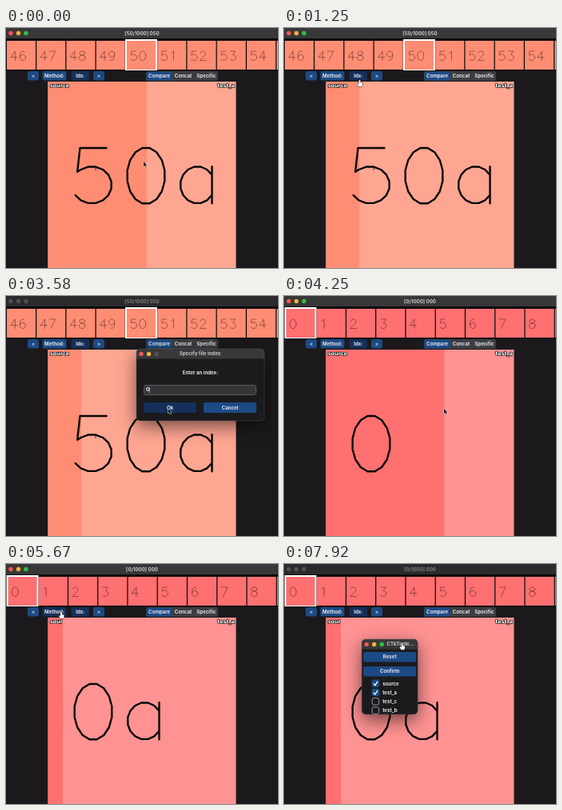
These frames come from a looping animation (340 by 300 pixels, 8000 ms). An HTML page with a canvas:

```html
<!DOCTYPE html>
<html lang="en">
<head>
<meta charset="utf-8">
<title>Image compare viewer</title>
<style>
html, body { margin: 0; width: 100%; height: 100%; overflow: hidden; background: #1b191c; }
canvas { display: block; width: 340px; height: 300px; }
</style>
</head>
<body>
<canvas id="stage" width="340" height="300"></canvas>
<script>
const ctx = document.getElementById('stage').getContext('2d');
const FPS = 12, FRAMES = 96;
const BLUE = '#1c4a85', HOVER = '#14305a', DARK = '#1b191c', BAR = '#38383a';
const LIGHTS = ['#f5564f', '#f5b52e', '#2fc23f'], GREY = '#515153';
const ASK = 18, LOAD = 46, PICK = 75, DRAG = 85;

// Stroke glyphs on a 21-unit-high grid; round parts are runs of a 16-sided ring.
function ring(cx, cy, rx, ry, first, last) {
  const pts = [], step = Math.sign(last - first);
  for (let i = first; i !== last + step; i += step) {
    const a = (i + .5) * Math.PI / 8;
    pts.push(`${(cx + rx * Math.cos(a)).toFixed(2)} ${(cy - ry * Math.sin(a)).toFixed(2)}`);
  }
  return pts.join(' ');
}
const GLYPHS = {
  0: `M${ring(10, 10.5, 7.2, 10.7, 0, 16)}`,
  1: 'M6 4L8 3 11 0V21',
  2: `M${ring(10, 5.5, 6, 5.5, 7, -2)} 3 21H17`,
  3: `M5 0H16L10 8 ${ring(10, 14.5, 7, 6.5, 3, -7)}`,
  4: 'M13 21V0L3 14H18',
  5: `M15 0L5 0 4 9 ${ring(9.5, 14, 7.5, 7, 5, -7)}`,
  6: `M${ring(10.5, 10.5, 6.5, 10.5, 2, 8)}M${ring(10.5, 14.5, 6.5, 6.5, 0, 16)}`,
  7: 'M3 0H17L7 21',
  8: `M${ring(10, 4.5, 6, 4.5, 0, 16)}M${ring(10, 15, 7, 6, 0, 16)}`,
  9: `M${ring(9.5, 10.5, 6.5, 10.5, 10, 16)}M${ring(9.5, 6.5, 6.5, 6.5, 0, 16)}`,
  a: `M15 7V21M${ring(9.5, 14, 6.5, 7, 1, 14)}`
};
for (const g in GLYPHS) GLYPHS[g] = new Path2D(GLYPHS[g]);

const ARROW = new Path2D('M0 0V6L1.3 4.8 2.2 6.8 3.2 6.4 2.4 4.4H4.2Z');
const HAND = new Path2D('M-.9.6Q0-.6.9.6V3L3.6 3.7V6L2.8 8.3H-1L-2.9 5.2-2.2 4.2-.9 5Z');

// Pointer moves: [leave, arrive, x, y]
const MOVES = [
  [0, 13, 94, 69], [13, 15, 94.5, 65],    // to the index button
  [20, 28, 230, 118], [35, 41, 203, 141], // to the entry, then Ok
  [47, 51, 200, 141], [51, 64, 71, 68],   // sweep over the picture
  [65, 68, 69, 60],                       // to the method button
  [76, 83, 65.5, 260.5], [DRAG, 93, 147.5, 99]
];

const asking = f => f >= ASK && f < LOAD;

function pointer(f) {
  let x = 172, y = 167;
  for (const [leave, arrive, toX, toY] of MOVES) {
    const u = Math.min(1, Math.max(0, (f - leave) / (arrive - leave)));
    const e = u * u * (3 - 2 * u);
    x += (toX - x) * e;
    y += (toY - y) * e;
  }
  return [x, y];
}

// The divider trails the pointer by one step while it is over the picture.
function divider(f) {
  for (let k = f - 1; k >= 0; k--) {
    const [x, y] = pointer(k);
    if (y > 67 && !asking(k) && k < PICK) return x;
  }
  return 176;
}

function rect(x, y, w, h, fill) {
  ctx.fillStyle = fill;
  ctx.fillRect(x, y, w, h);
}

function round(x, y, w, h, r, fill, stroke) {
  ctx.beginPath();
  ctx.roundRect(x, y, w, h, r);
  ctx.fillStyle = fill;
  ctx.fill();
  if (stroke) {
    ctx.strokeStyle = stroke;
    ctx.lineWidth = 1;
    ctx.stroke();
  }
}

function text(s, x, y, color = '#e4e6ea', align = 'center') {
  ctx.font = '700 6.1px Inter, sans-serif';
  ctx.textAlign = align;
  ctx.fillStyle = color;
  ctx.fillText(s, x, y);
}

function lights(x, y, colors) {
  colors.forEach((c, i) => {
    ctx.beginPath();
    ctx.arc(x + i * 9.5, y, 2.7, 0, 7);
    ctx.fillStyle = c;
    ctx.fill();
  });
}

function button(label, x, y, w, h, [px, py], pressed) {
  const over = px >= x && px <= x + w && py >= y && py <= y + h;
  round(x, y, w, h, 2.5, over || pressed ? HOVER : BLUE);
  text(label, x + w / 2, y + h / 2 + .3);
}

function glyphs(s, x, y, scale, width, color) {
  ctx.save();
  ctx.translate(x, y);
  ctx.scale(scale, scale);
  ctx.lineWidth = width / scale;
  ctx.lineJoin = ctx.lineCap = 'round';
  ctx.strokeStyle = color;
  for (const c of s) {
    ctx.stroke(GLYPHS[c]);
    ctx.translate(20, 0);
  }
  ctx.restore();
}

function tag(s, x, align) {
  ctx.font = '700 6.4px "DejaVu Sans", sans-serif';
  ctx.textAlign = align;
  ctx.lineJoin = 'round';
  ctx.lineWidth = 1.3;
  ctx.strokeStyle = '#111';
  ctx.strokeText(s, x, 72.8);
  ctx.fillStyle = '#fff';
  ctx.fillText(s, x, 72.8);
}

function layer(x, end, color, s, label, labelX, align) {
  ctx.save();
  ctx.beginPath();
  ctx.rect(x, 67, end - x, 233);
  ctx.clip();
  rect(52, 67, 236, 233, color);
  glyphs(s, 76, 150, 3.3, 2.4, '#080606');
  tag(label, labelX, align);
  ctx.restore();
}

function strip(first, selected, base, color) {
  rect(0, 13, 340, 41, '#0d0c0e');
  for (let i = 0; i < 10; i++) {
    const n = first + i;
    const x = base + 37.25 * i + (n === selected ? 1 : n > selected ? 2 : 0);
    if (n === selected) rect(x - 2, 14, 40, 39, '#fff');
    rect(x, 16, 36, 36, color);
    glyphs(String(n), x + 3.2, 29, .55, .6, 'rgba(25,5,5,.7)');
  }
}

function frameWindow(x, y, w, h, title, titleX, colors) {
  ctx.save();
  ctx.shadowColor = 'rgba(0,0,0,.55)';
  ctx.shadowBlur = 22;
  ctx.shadowOffsetY = 7;
  round(x, y, w, h, 5, '#1b1b1d');
  ctx.restore();
  round(x, y, w, 12.5, [5, 5, 0, 0], BAR);
  round(x, y, w, h, 5, 'transparent', 'rgba(90,90,92,.4)');
  lights(x + 6, y + 6.4, colors);
  text(title, titleX, y + 6.6, '#c9c9cb');
}

function indexDialog(f, p) {
  frameWindow(163, 66, 160, 90, 'Specify file index', 242.5, [LIGHTS[0], LIGHTS[1], GREY]);
  text('Enter an index:', 243, 96);
  round(172.5, 111.5, 140, 12, 2.5, '#343638', '#565b5e');
  const typed = f >= 33 ? '0' : '';
  text(typed, 175, 117.5, '#e4e6ea', 'left');
  if (f >= 31) rect(typed ? 179 : 175, 114, .7, 7, '#ddd');
  button('Ok', 172, 133, 66, 13, p);
  button('Cancel', 247, 133, 66, 13, p);
}

function picker(f, p) {
  const grip = pointer(Math.max(f, DRAG));
  const x = grip[0] - 50.3, y = grip[1] - 5;
  frameWindow(x, y, 70, 94, 'CTkTople...', x + 48.5, LIGHTS);
  button('Reset', x + 2, y + 16, 66, 12.5, p);
  button('Confirm', x + 2, y + 34, 66, 12.5, p);
  ['source', 'test_a', 'test_c', 'test_b'].forEach((name, i) => {
    const bx = x + 12.5, by = y + 50.5 + i * 11.3;
    if (i < 2) {
      round(bx, by, 9.5, 9.5, 2, BLUE);
      ctx.lineWidth = 1.3;
      ctx.strokeStyle = '#fff';
      ctx.stroke(new Path2D(`M${bx + 2.2} ${by + 5}l2 2.2 3.2-5`));
    } else {
      round(bx + .5, by + .5, 8.5, 8.5, 2, '#1b1b1d', '#949a9f');
    }
    text(name, x + 26, by + 5.2, '#e4e6ea', 'left');
  });
}

function toolbar(p) {
  rect(0, 53.5, 340, 13.5, DARK);
  button('<', 27, 54, 14, 11.5, p);
  button('Method:', 45.5, 54, 30, 11.5, p);
  button('Idx:', 81.5, 54, 22.5, 11.5, p, true);
  button('>', 109, 54, 14, 11.5, p);
  round(175, 54, 90, 12, 2.5, '#3d3d41');
  round(175.5, 54.5, 32, 11, 2.5, BLUE);
  text('Compare', 191.5, 60.3);
  text('Concat', 221.5, 60.3);
  text('Specific', 250.5, 60.3);
}

function cursor(f, p) {
  const hand = (p[1] < 67 && !asking(f)) || f >= PICK;
  ctx.save();
  ctx.translate(...p);
  ctx.lineWidth = .9;
  ctx.lineJoin = 'round';
  ctx.strokeStyle = hand ? '#111' : '#eee';
  ctx.fillStyle = hand ? '#fff' : '#111';
  ctx.stroke(hand ? HAND : ARROW);
  ctx.fill(hand ? HAND : ARROW);
  ctx.restore();
}

function draw(f) {
  const p = pointer(f), loaded = f >= LOAD;
  const blurred = asking(f) || f >= PICK;
  ctx.textBaseline = 'middle';

  rect(0, 0, 340, 300, DARK);
  rect(0, 0, 340, 13.5, blurred ? '#2b2a2c' : BAR);
  lights(6, 6.5, blurred ? [GREY, GREY, GREY] : LIGHTS);
  text(loaded ? '[0/1000] 000' : '[50/1000] 050', 170, 6.7, blurred ? '#7c7c7e' : '#c9c9cb');

  const left = loaded ? '#ff7071' : '#ff8d74';
  const right = loaded ? '#ff9292' : '#ffa692';
  const digits = loaded ? '0' : '50';
  strip(loaded ? 0 : 46, loaded ? 0 : 50, loaded ? 1.6 : 1, left);
  toolbar(p);
  layer(52.5, 287.5, right, digits + 'a', 'test_a', 286, 'right');
  layer(52.5, divider(f), left, digits, 'source', 55, 'left');
  if (!loaded) rect(111, 175.5, 2, 2, '#2f5f9e');

  if (asking(f)) indexDialog(f, p);
  if (f >= PICK) picker(f, p);
  cursor(f, p);
}

const start = performance.now();
function tick() {
  const ms = performance.now() - start;
  draw(Math.floor((ms + 5) * FPS / 1000) % FRAMES);
  requestAnimationFrame(tick);
}
tick();
</script>
</body>
</html>
```
